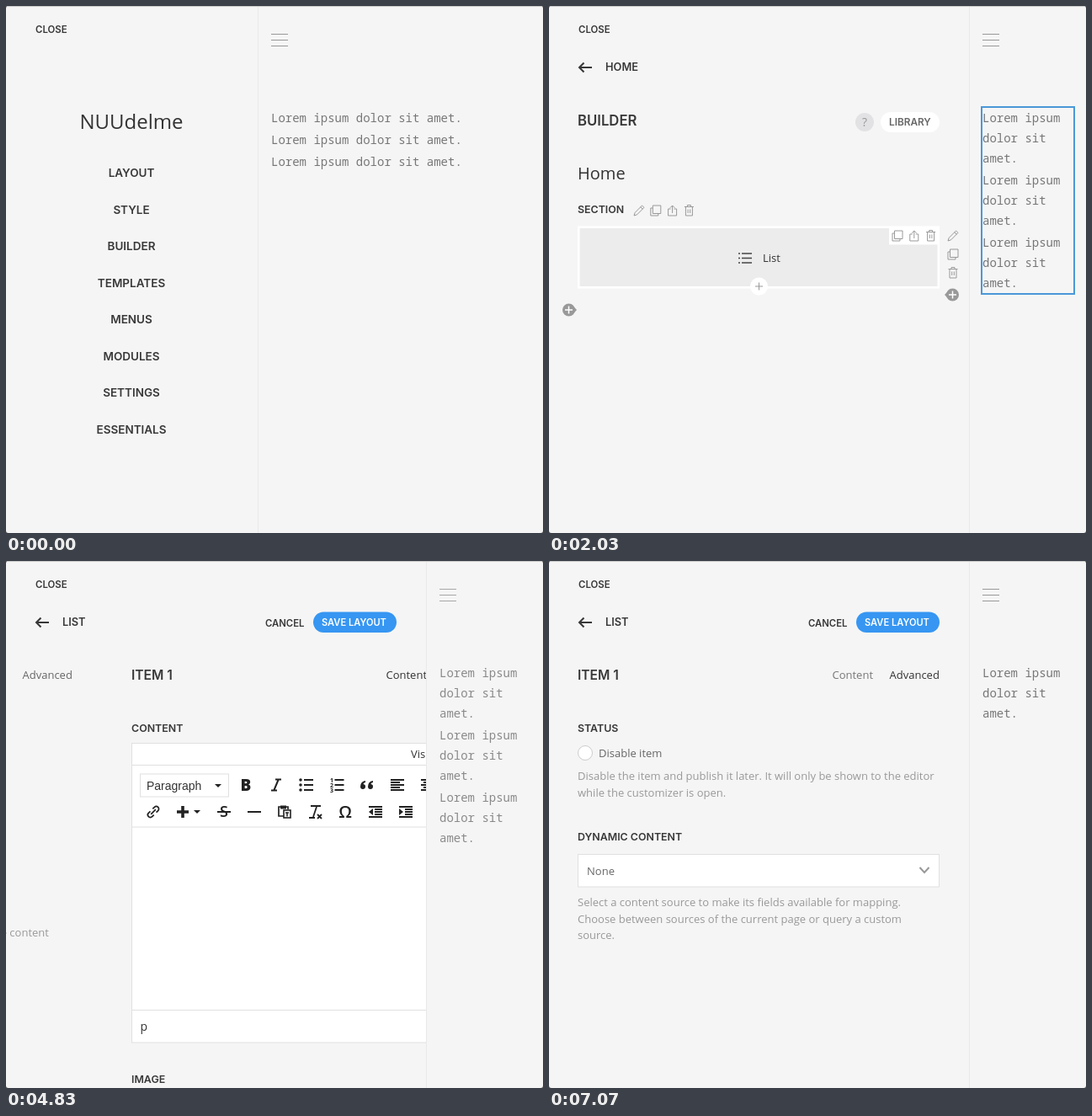
Recreate the animation shown at these times as an HTML page. Size 638x626 px, loop 8000 ms.

```html
<!DOCTYPE html>
<html lang="en">
<head>
<meta charset="utf-8">
<title>Page builder</title>
<style>
html, body { margin: 0; width: 100%; height: 100%; overflow: hidden; background: #555; }
#stage { position: relative; width: 638px; height: 626px; overflow: hidden; background: #f5f5f5; border-radius: 3px; }
#stage::after { content: ""; position: absolute; inset: 0 0 auto; height: 1px; background: #ccc; }
#side { position: absolute; left: 0; top: 0; height: 626px; overflow: hidden; box-sizing: border-box; border-right: 1px solid #e9e9e9; }
#side svg { display: block; font-family: "Open Sans", sans-serif; fill: #666; }
.h { font-family: Inter, sans-serif; font-weight: 600; fill: #383838; }
.muted { fill: #999; }
.dark { fill: #333; }
.thin { fill: none; stroke: #999; stroke-width: 1; }
.ink { fill: none; stroke: #222; stroke-width: 2; }
.solid { fill: #222; }
#view { position: absolute; top: 0; right: 15px; height: 626px; }
#view i { position: absolute; left: 0; width: 20px; height: 1px; background: #999; }
#view ul { position: absolute; top: 121px; left: 0; width: 100%; margin: 0; padding: 0; list-style: none;
  font: 300 14px/24px "Noto Sans Mono", monospace; color: #777; }
#view li + li { margin-top: 2px; }
#view ul.on { outline: 2px solid #4a98d8; }
</style>
</head>
<body>
<div id="stage">
  <div id="view">
    <i style="top:33px"></i><i style="top:40px"></i><i style="top:47px"></i>
    <ul id="list"><li>Lorem ipsum dolor sit amet.</li><li>Lorem ipsum dolor sit amet.</li><li>Lorem ipsum dolor sit amet.</li></ul>
  </div>
  <div id="side"></div>
</div>
<script>
const LOOP = 8000, TICK = 70;
const $ = id => document.getElementById(id);

// y is the middle of the capitals
const text = (x, y, s, size = 13, attrs = '') =>
  `<text x="${x}" y="${y + size * .36}" font-size="${size}" ${attrs}>${s}</text>`;
const head = (x, y, s, size = 12.4, attrs = '') => text(x, y, s, size, 'class="h" ' + attrs);
const muted = (x, y, s) => text(x, y, s, 13, 'class="muted"');
const rect = (x, y, w, h, fill, attrs = '') =>
  `<rect x="${x}" y="${y}" width="${w}" height="${h}" fill="${fill}" ${attrs}/>`;
const pill = (x, y, w, h, fill) => rect(x, y, w, h, fill, `rx="${h / 2}"`);
const circle = (x, y, r, fill, attrs = '') => `<circle cx="${x}" cy="${y}" r="${r}" fill="${fill}" ${attrs}/>`;
const path = (d, cls, style = '') => `<path d="${d}" class="${cls}" style="${style}"/>`;
const at = (x, y, body) => `<g transform="translate(${x} ${y})">${body}</g>`;
const turn = (a, body) => `<g transform="rotate(${a})">${body}</g>`;
const group = (id, body) => `<g id="${id}">${body}</g>`;
const middle = 'text-anchor="middle"';

const thin = {
  pencil: 'M-6 6l1.2-3.6L3.5-6 6-3.6-2.4 4.8ZM1.8-4.2 4.2-1.8',
  copy: 'M-3.5-6H6V3.5H-3.5ZM-3.5-3H-6V6H3V3.5',
  share: 'M-2-2H-5V6H5V-2H2M0 3V-6M-2.8-3.2 0-6 2.8-3.2',
  trash: 'M-5.5-4.5H5.5M-2-4.5V-6.5H2V-4.5M-4-4.5V6H4V-4.5M-1.3-1.5V3M1.3-1.5V3',
};
const tool = (name, x, y) => at(x, y, path(thin[name], 'thin'));

const rows = (...spans) => path(spans.map(([a, b], i) => `M${a} ${i * 3 - 6}H${b}`).join(''), 'ink');
const full = [-8, 8];
const caret = path('M-4-2H4L0 2Z', 'solid');
const quote = path('M-8 2Q-8-4-2-5V-3Q-4.5-2.5-4.5-1A3 3 0 1 1-8 2M1 2Q1-4 7-5V-3Q4.5-2.5 4.5-1A3 3 0 1 1 1 2', 'solid');
const glyph = (s, size, weight) => text(0, 0, s, size, `${middle} font-weight="${weight}" class="solid"`);
const lines = path('M-3-6H8M-3 0H8M-3 6H8', 'ink');
const dots = [-6, 0, 6].map(y => circle(-7, y, 1.8, '#222')).join('');
const digits = [1, 2, 3].map(n => text(-8.5, n * 6 - 12, n, 7, 'class="solid" font-weight="700"')).join('');
const indent = arrow => rows(full, [-1, 8], [-1, 8], [-1, 8], full) + path(arrow, 'solid');

const rowOne = [
  [170, glyph('B', 19, 800)],
  [206, path('M-1-6.5H6M-6 6.5H1M2.5-6 -2.5 6', 'ink')],
  [242, lines + dots],
  [278.5, lines + digits],
  [314, quote],
  [350, rows(full, [-8, 3], full, [-8, 3], full)],
  [386, rows(full, [-5, 5], full, [-5, 5], full)],
  [422, rows(full, [-3, 8], full, [-3, 8], full)],
];
const rowTwo = [
  [60, turn(-45, path('M-2-3H-5A3 3 0 0 0-5 3H-2M2-3H5A3 3 0 0 1 5 3H2M-4 0H4', 'ink', 'stroke-width:1.7'))],
  [95, path('M-7 0H7M0-7V7', 'ink', 'stroke-width:3.6') + at(17, 0, caret)],
  [144, glyph('S', 18, 600) + path('M-8 0H8', 'ink')],
  [180, path('M-8 0H8', 'ink')],
  [216, path('M-1 5H-7V-6H4V-3', 'ink', 'stroke-width:1.7') + rect(-5, -7.5, 7, 4, '#222') +
    rect(-1, -2, 8, 9, '#fff', 'stroke="#222" stroke-width="1.6"') + path('M1 1H5M3 1V5.5', 'ink', 'stroke-width:1.5')],
  [252, path('M-5-7H7M2-6 -2 6M-7 7H0M3 3 8 8M8 3 3 8', 'ink', 'stroke-width:1.8')],
  [288, glyph('Ω', 20, 600)],
  [324, indent('M-3-4V4L-8 0Z')],
  [360, indent('M-8-4V4L-3 0Z')],
  [396, [0, 90, 180, 270].map(a => turn(a, path('M-8-8H-2L-8-2Z', 'solid') + path('M-6-6-2-2', 'ink'))).join('')],
];

const items = ['LAYOUT', 'STYLE', 'BUILDER', 'TEMPLATES', 'MENUS', 'MODULES', 'SETTINGS', 'ESSENTIALS'];
const menu = rect(-300, 264, 599, 43.5, '#e2e2e4', 'id="mark"') +
  text(149, 137, 'NUUdelme', 24, middle + ' class="dark"') +
  items.map((s, i) => head(149, 198.3 + 43.5 * i, s, 13.5, `${middle} id="m${i}"`)).join('');

const plus = (cls, style) => path('M-4.5 0H4.5M0-4.5V4.5', cls, style);
const plusDrop = dir => `<g transform="scale(${dir} 1)"><path d="M3-7 9.5 0 3 7Z" fill="#999"/></g>` +
  circle(0, 0, 7.5, '#999') + plus('thin', 'stroke:#fff;stroke-width:1.5');

const builder = head(34, 135.5, 'BUILDER', 16.7) +
  circle(375, 138, 11, '#e2e2e4') + text(375, 138, '?', 14, middle + ' class="muted"') +
  pill(394, 126, 70, 24, '#fff') + head(404, 138, 'LIBRARY', 11.8, 'style="fill:#666"') +
  text(34, 198.5, 'Home', 20, 'class="dark"') + head(34, 242, 'SECTION') +
  rect(35.2, 262.7, 427.6, 71.6, '#f5f5f5', 'stroke="#fff" stroke-width="2.6" id="cell"') +
  group('hover',
    ['pencil', 'copy', 'share', 'trash'].map((n, i) => tool(n, 107 + 19.8 * i, 243)).join('') +
    at(233, 299.5, path('M-4-5.5H8M-4 0H8M-4 5.5H8M-8-5.5H-6M-8 0H-6M-8 5.5H-6', 'thin', 'stroke:#444;stroke-width:1.3')) +
    text(254, 299.5, 'List', 13, 'class="dark"') +
    rect(404, 262, 60, 21.5, '#fff') +
    ['copy', 'share', 'trash'].map((n, i) => tool(n, 414 + 19.8 * i, 273)).join('') +
    ['pencil', 'copy', 'trash'].map((n, i) => tool(n, 480, 273 + 22 * i)).join('') +
    circle(249.5, 333, 10.5, '#fff') + at(249.5, 333, plus('thin')) +
    at(23.5, 361, plusDrop(1)) + at(479.5, 343, plusDrop(-1)));

const check = (y, s) => circle(43, y, 9, '#3696f2') +
  at(43, y, path('M-4.5 .5-1.5 3.5 4.5-3.5', 'thin', 'stroke:#fff;stroke-width:1.7')) + text(59, y, s);

const list = head(34, 135.5, 'LIST', 16.2) +
  text(268, 135.5, 'Content', 13, 'class="dark"') + text(336.5, 135.5, 'Settings') + text(404.5, 135.5, 'Advanced') +
  head(34, 198.5, 'ITEMS') + group('none', muted(34, 228, 'No items yet.')) +
  group('row', text(34, 238, 'Item')) +
  group('rest',
    pill(34, 257, 128, 41, '#fff') + head(64, 277.5, 'ADD ITEM', 14, 'id="add"') +
    pill(172, 257, 141, 41, '#fff') + head(202, 277.5, 'ADD MEDIA', 14.1, 'style="fill:#6a6a6a"') +
    head(34, 341, 'DISPLAY') + check(370.5, 'Show the image') + check(390, 'Show the link') +
    muted(34, 417.5, 'Show or hide content fields without the need to delete the content') + muted(34, 437, 'itself.'));

const line = y => path(`M34.5 ${y}H463.5`, 'thin', 'stroke:#e0e0e0');
const frame = 'stroke="#e0e0e0"';
const grip = [0, 1, 2, 3].map(i => [...Array(i + 1)].map((_, j) => rect(451 + i * 2.7, 567.5 - j * 2.7, 2, 2, '#999')).join('')).join('');
const editor = head(34, 198.5, 'CONTENT') + rect(34.5, 216.5, 429, 355.5, '#fff', frame) +
  text(366, 229.5, 'Visual', 13, 'class="dark"') + muted(421.5, 229.5, 'Code') +
  [242.5, 316, 533.5].map(line).join('') +
  rect(44.5, 253, 105, 27, '#fff', frame) +
  text(52, 267, 'Paragraph', 14, 'class="dark" style="font-family:\'Liberation Sans\',sans-serif"') +
  at(137, 267, caret) +
  rowOne.map(([x, g]) => at(x, 266, g)).join('') + rowTwo.map(([x, g]) => at(x, 298, g)).join('') +
  text(44.5, 553, 'p', 14, 'class="dark"') + grip + head(34, 616, 'IMAGE');

const status = head(34, 198.5, 'STATUS') + circle(43, 228, 8.5, '#fff', 'stroke="#ccc"') + text(59, 228, 'Disable item') +
  muted(34, 255.5, 'Disable the item and publish it later. It will only be shown to the editor') +
  muted(34, 275, 'while the customizer is open.') +
  head(34, 328, 'DYNAMIC CONTENT') + rect(34.5, 348.5, 429, 38.5, '#fff', frame) + text(45, 368, 'None') +
  at(446, 367, path('M-5.5-3 0 3 5.5-3', 'thin', 'stroke-width:2')) +
  muted(34, 405.5, 'Select a content source to make its fields available for mapping.') +
  muted(34, 425, 'Choose between sources of the current page or query a custom') + muted(34, 444.5, 'source.');

const item = head(34, 135.5, 'ITEM 1', 15.6) +
  text(336.5, 135.5, 'Content', 13, 'id="tabA"') + text(404.5, 135.5, 'Advanced', 13, 'id="tabB"') +
  group('editor', editor) + group('status', status);

$('side').innerHTML = '<svg width="500" height="626">' +
  group('menu', menu) + group('builder', builder) + group('panel', list) + group('item', item) +
  head(35, 28, 'CLOSE', 11.4) +
  group('crumb', at(43, 73, path('M8 0H-7M-1.5-5.5-7 0-1.5 5.5', 'ink', 'stroke:#383838')) + head(67, 72.5, 'HOME', 12.8, 'id="back"')) +
  group('save', head(308, 74, 'CANCEL', 11.3) + pill(365, 60.5, 99, 24.5, '#3696f2') +
    head(375, 72.7, 'SAVE LAYOUT', 11.1, 'style="fill:#fff"')) +
  '</svg>';

// CSS "ease" curve between start and start + time
function ease(t, start, time) {
  const x = Math.min(1, Math.max(0, (t - start) / time));
  if (x === 0 || x === 1) return x;
  const bez = (u, a, b) => 3 * (1 - u) ** 2 * u * a + 3 * (1 - u) * u * u * b + u ** 3;
  let lo = 0, hi = 1;
  for (let i = 0; i < 24; i++) {
    const mid = (lo + hi) / 2;
    if (bez(mid, .25, .25) < x) lo = mid; else hi = mid;
  }
  return bez(lo, .1, 1);
}

const show = (id, on) => $(id).style.display = on ? '' : 'none';
const fill = (id, c) => $(id).style.fill = c;
const move = (id, x, y = 0) => $(id).setAttribute('transform', `translate(${Math.round(x)} ${y})`);
const slide = (id, enter, leave, width) => {
  show(id, enter > 0 && leave < 1);
  move(id, (1 - enter) * width - leave * 500);
};

function draw(now) {
  const t = Math.floor(now % LOOP / TICK) * TICK;
  const open = ease(t, 945, 500), toList = ease(t, 2400, 260);
  const toItem = ease(t, 4708, 260), toStatus = ease(t, 6771.5, 260);
  const width = Math.round(300 + 200 * open);

  $('side').style.width = width + 'px';
  $('view').style.left = width + 15 + 'px';
  $('view').style.opacity = t >= 4550 && t < 5460 ? Math.max(.85, 1 - (t - 4480) / 1400) : 1;
  $('list').className = t >= 2030 && t < 2450 ? 'on' : '';
  [...$('list').children].forEach((li, i) => li.style.display = i && t >= 5460 ? 'none' : '');

  show('menu', open < 1);
  move('menu', -300 * open);
  show('mark', open > 0);
  fill('m2', t >= 700 ? '#2c2c2c' : t >= 560 ? '#303030' : '#383838');

  slide('builder', open, toList, width);
  show('hover', t >= 2030);
  fill('cell', t >= 2100 ? '#e8e8e9' : t >= 2030 ? '#ececec' : '#f5f5f5');

  slide('panel', toList, toItem, 500);
  const added = t >= 4550;
  show('none', !added);
  show('row', added);
  move('rest', 0, added ? 24 : 0);
  fill('add', t >= 4130 ? '#333' : t >= 4060 ? '#505050' : '#6a6a6a');

  slide('item', toItem, 0, 500);
  slide('editor', 1, toStatus, 500);
  slide('status', toStatus, 0, 500);
  fill('tabA', toStatus ? '#777' : '#333');
  fill('tabB', t >= 6230 ? '#333' : '#777');

  $('crumb').style.opacity = open;
  $('back').textContent = toItem ? 'LIST' : toList ? 'BUILDER' : 'HOME';
  show('save', added);
}

const start = performance.now();
(function loop() {
  draw(performance.now() - start);
  requestAnimationFrame(loop);
})();
</script>
</body>
</html>
```
